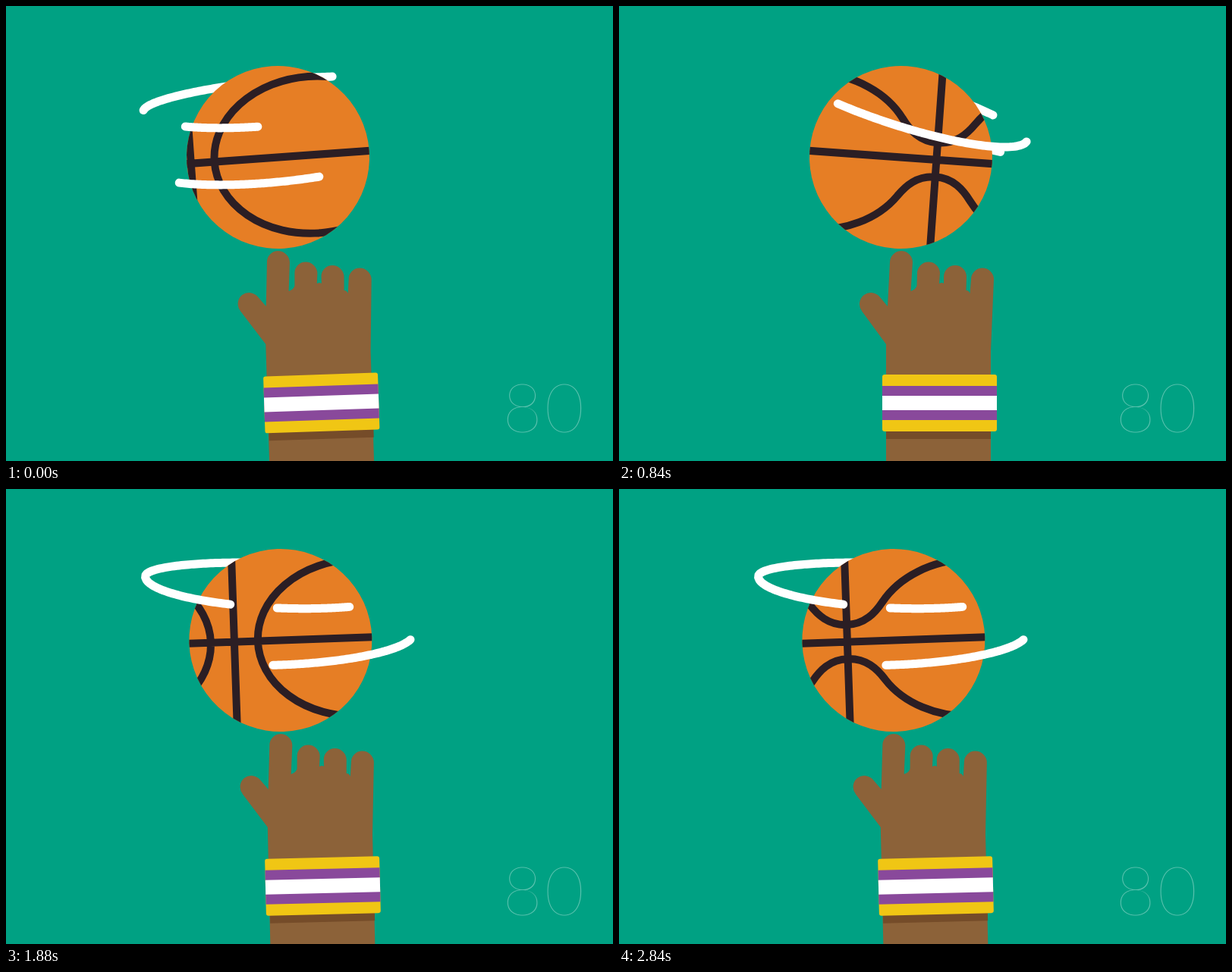
Animation, 800 px wide and 600 px high, one loop 2880 ms. Source, as an HTML page with a canvas:

```html
<!DOCTYPE html>
<html lang="en">
<head>
<meta charset="utf-8">
<title>Spinning basketball</title>
<style>
  html, body { margin: 0; width: 100%; height: 100%; overflow: hidden; background: #00a183; }
  canvas { display: block; }
</style>
</head>
<body>
<canvas id="stage" width="800" height="600"></canvas>
<script>
const ctx = document.getElementById('stage').getContext('2d');
const TAU = Math.PI * 2;
const STEP = 40, STEPS = 72, BEAT = 6;

const COLOR = {
  back: '#00a183', ball: '#e67e25', seam: '#2b1e24', skin: '#8c6239',
  shade: '#754c29', gold: '#f0c614', purple: '#89499b', white: '#fff',
  label: 'rgba(255,255,255,.36)'
};

const lerp = (a, b, k) => a + (b - a) * k;
const smooth = k => k * k * (3 - 2 * k);
const rad = deg => deg * Math.PI / 180;

// Cubic easing with control points (.167,.167) and (.667,1)
function settle(x) {
  const curve = (a, b, s) => 3 * (1 - s) ** 2 * s * a + 3 * (1 - s) * s * s * b + s ** 3;
  let lo = 0, hi = 1;
  for (let i = 0; i < 24; i++) {
    const mid = (lo + hi) / 2;
    if (curve(.167, .667, mid) < x) lo = mid; else hi = mid;
  }
  return curve(.167, 1, lo);
}

/* ---- Streaks orbiting the ball ---- */
const ORBIT = { rx: 177, back: 24, front: 35 };
const SAMPLES = 720;
const arc = [0];
for (let i = 1; i <= SAMPLES; i++) {
  const a = (i - .5) / SAMPLES * TAU;
  arc[i] = arc[i - 1] + Math.hypot(ORBIT.rx * Math.sin(a), 29.5 * Math.cos(a));
}

// Fraction of the way round the orbit -> angle
function angleAt(s) {
  const want = (s - Math.floor(s)) * arc[SAMPLES];
  let lo = 0, hi = SAMPLES;
  while (hi - lo > 1) {
    const mid = (lo + hi) >> 1;
    if (arc[mid] <= want) lo = mid; else hi = mid;
  }
  return (lo + (want - arc[lo]) / (arc[hi] - arc[lo])) / SAMPLES * TAU;
}

const STREAKS = [
  { y: 122, tilt: 18, tail: .503, len: .35 },
  { y: 122, tilt: 18, tail: .289, len: .13 },
  { y: 197, tilt: 5, tail: .178, len: .252 }
];

function drawStreaks(pose, inFront) {
  for (const streak of STREAKS) {
    ctx.save();
    ctx.translate(pose.x - 1.5, streak.y - pose.lift);
    ctx.rotate(rad(lerp(-5.6, streak.tilt, pose.swing)));
    ctx.beginPath();
    let pen = false;
    for (let i = 0; i <= 80; i++) {
      const a = angleAt(streak.tail + pose.turn + streak.len * i / 80);
      const sin = Math.sin(a), front = sin >= 0;
      if (front === inFront) {
        const x = ORBIT.rx * Math.cos(a);
        const y = sin * (front ? ORBIT.front : ORBIT.back);
        if (pen) ctx.lineTo(x, y); else ctx.moveTo(x, y);
      }
      pen = front === inFront;
    }
    ctx.strokeStyle = COLOR.white;
    ctx.lineWidth = 11;
    ctx.lineCap = ctx.lineJoin = 'round';
    ctx.stroke();
    ctx.restore();
  }
}

/* ---- Ball ---- */
const BALL_R = 120.5, GAP = 324;

// One quarter of the curved seam beside a vertical seam at x = 0
function seamQuarter(wavy) {
  let from = Math.PI;
  if (wavy) {
    from += .5156;
    ctx.moveTo(0, -22.5);
    ctx.bezierCurveTo(24, -22.5, 38, -37, 48, -51);
  } else {
    ctx.moveTo(31, 0);
  }
  ctx.ellipse(GAP / 2, 0, 131, 103.5, 0, from, Math.PI * 1.5);
}

function drawBall(pose) {
  ctx.save();
  ctx.translate(pose.x, 199.5 - pose.lift);
  ctx.rotate(rad(pose.tilt));
  ctx.beginPath();
  ctx.arc(0, 0, BALL_R, 0, TAU);
  ctx.fillStyle = COLOR.ball;
  ctx.fill();
  ctx.clip();

  ctx.beginPath();
  ctx.moveTo(-130, 0);
  ctx.lineTo(130, 0);
  for (let k = 0; k < 5; k++) {
    const x = -115 + GAP * k - GAP / BEAT * pose.spin;
    if (Math.abs(x) > GAP) continue;
    ctx.moveTo(x, -130);
    ctx.lineTo(x, 130);
    for (const sx of [-1, 1]) for (const sy of [-1, 1]) {
      ctx.save();
      ctx.translate(x, 0);
      ctx.scale(sx, sy);
      seamQuarter(k % 2 === 1);
      ctx.restore();
    }
  }
  ctx.strokeStyle = COLOR.seam;
  ctx.lineWidth = 10;
  ctx.lineCap = ctx.lineJoin = 'round';
  ctx.stroke();
  ctx.restore();
}

/* ---- Arm ---- */
function drawArm(sway) {
  const lean = 1 - sway;
  ctx.save();
  ctx.transform(1, 0, .0309 * lean, 1, -.0309 * 760 * lean, 0);
  ctx.beginPath();
  ctx.moveTo(352, 602);
  ctx.lineTo(352, 446);
  ctx.lineTo(319.8, 402);
  ctx.arc(332, 393, 15, rad(143), rad(323));
  ctx.lineTo(354, 396);
  ctx.lineTo(357, 338);
  ctx.arc(372, 338, 15, Math.PI, 0);
  ctx.lineTo(384.5, 376);
  ctx.quadraticCurveTo(391, 374, 392.5, 369);
  ctx.lineTo(393, 352.5);
  ctx.arc(408, 352.5, 15, Math.PI, 0);
  ctx.lineTo(422, 366);
  ctx.quadraticCurveTo(426, 364, 428, 366);
  ctx.lineTo(428, 357);
  ctx.arc(443, 357, 15, Math.PI, 0);
  ctx.lineTo(457.5, 375);
  ctx.quadraticCurveTo(461, 375, 462.5, 379);
  ctx.lineTo(464, 360.5);
  ctx.arc(479, 360.5, 15, Math.PI, 0);
  ctx.lineTo(490, 455);
  ctx.lineTo(490, 602);
  ctx.fillStyle = COLOR.skin;
  ctx.fill();
  ctx.restore();

  ctx.save();
  ctx.translate(422.5 - 8 * lean, 486);
  ctx.rotate(rad(-1.9 * lean));
  const bar = (color, x, y, w, h) => {
    ctx.fillStyle = color;
    ctx.fillRect(x, y, w, h);
  };
  bar(COLOR.shade, -70.5, 70, 138, 15);
  ctx.beginPath();
  ctx.roundRect(-75.5, 0, 151, 75, 3);
  ctx.fillStyle = COLOR.gold;
  ctx.fill();
  bar(COLOR.purple, -75.5, 15, 151, 45);
  bar(COLOR.white, -75.5, 28, 151, 19);
  ctx.restore();
}

function drawLabel() {
  ctx.font = '200 90px Lato, "Open Sans", sans-serif';
  ctx.letterSpacing = '3px';
  ctx.fillStyle = COLOR.label;
  ctx.fillText('80', 654.5, 562);
}

function poseAt(n) {
  const swing = 1 - Math.abs(n % BEAT - 3) / 3;
  const eased = smooth(swing);
  const tossed = n >= 30 && n <= 42;
  const sway = tossed ? 0 : eased;
  return {
    swing, sway,
    x: 358.5 + 13 * sway,
    tilt: lerp(-4.1, 4.1, eased),
    lift: tossed ? 46 * settle(1 - Math.abs(n - 36) / 6) : 0,
    turn: n / BEAT,
    spin: n % (3 * BEAT)
  };
}

function draw(ms) {
  const pose = poseAt(Math.floor(ms / STEP + 1e-6) % STEPS);
  ctx.fillStyle = COLOR.back;
  ctx.fillRect(0, 0, 800, 600);
  drawLabel();
  drawArm(pose.sway);
  drawStreaks(pose, false);
  drawBall(pose);
  drawStreaks(pose, true);
}

const start = performance.now();
function tick() {
  draw(Math.max(0, performance.now() - start));
  requestAnimationFrame(tick);
}
tick();
</script>
</body>
</html>
```
